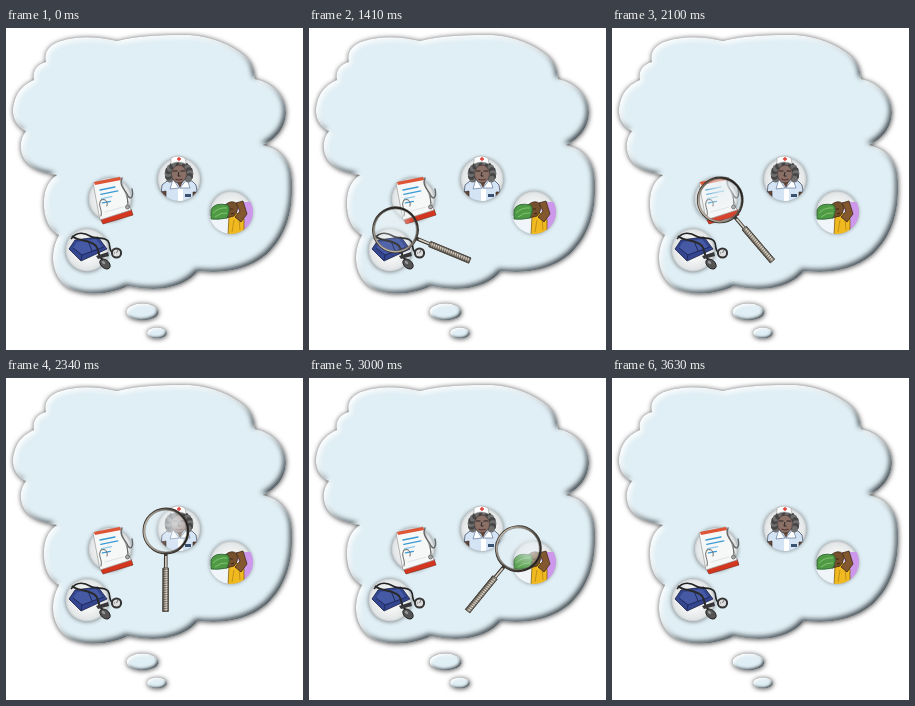
Animation, 297 px wide and 322 px high, one loop 3900 ms. Source, as an HTML page with a canvas:

```html
<!DOCTYPE html>
<html lang="en">
<head>
<meta charset="utf-8">
<title>Thought bubble</title>
<style>
html, body { margin: 0; width: 100%; height: 100%; overflow: hidden; background: #fff; }
canvas { display: block; width: 297px; height: 322px; }
</style>
</head>
<body>
<canvas id="stage" width="297" height="322"></canvas>
<script>
const W = 297, H = 322, LOOP = 3900, STEP = 30, TAU = Math.PI * 2;
const ctx = document.getElementById('stage').getContext('2d');
const scene = document.createElement('canvas');
scene.width = W;
scene.height = H;
const g = scene.getContext('2d');

const cloud = new Path2D(`M28 52 C26 43 31 36 40 34 C37 24 44 16 55 13
  C73 7 94 9 111 13 C134 7 160 7 184 7 C205 8 226 17 239 28
  C246 34 249 43 249 51 C265 54 280 67 280 84
  C280 100 269 112 257 117 C277 121 287 137 286 156
  C287 182 281 207 261 226 C241 243 215 246 192 243
  C181 257 156 266 122 258 C106 266 82 269 64 261
  C48 252 41 229 53 207 C41 201 37 186 38 171 C39 160 43 152 51 147
  C34 145 17 138 15 122 C14 114 16 108 20 103
  C8 98 5 85 8 75 C11 62 19 56 28 52Z`);

function oval(x, y, rx, ry = rx, turn = 0) {
  const p = new Path2D();
  p.ellipse(x, y, rx, ry, turn, 0, TAU);
  return p;
}

function shadow(color, blur, dx, dy) {
  g.shadowColor = color;
  g.shadowBlur = blur;
  g.shadowOffsetX = dx;
  g.shadowOffsetY = dy;
}

// Shades the inside of a path along its edge
function innerShade(path, color, blur, dx, dy) {
  const inverse = new Path2D();
  inverse.rect(-60, -60, W + 120, H + 120);
  inverse.addPath(path);
  g.save();
  g.clip(path);
  shadow(color, blur, dx, dy);
  g.fillStyle = '#aaa';
  g.fill(inverse, 'evenodd');
  g.restore();
}

function puff(path, depth) {
  g.save();
  shadow('rgba(0,0,0,.7)', 5, 0.3, 0.5);
  g.fillStyle = '#e0eff5';
  g.fill(path);
  g.restore();
  innerShade(path, 'rgba(45,54,60,.9)', depth, -depth * 0.5, -depth * 0.5);
  innerShade(path, '#fff', depth, depth * 0.5, depth * 0.5);
}

function shape(d, fill, line, width = 0.8) {
  const p = d instanceof Path2D ? d : new Path2D(d);
  if (fill) {
    g.fillStyle = fill;
    g.fill(p);
  }
  if (line) {
    g.strokeStyle = line;
    g.lineWidth = width;
    g.stroke(p);
  }
}

function disc(x, y, r) {
  const grad = g.createRadialGradient(x, y, r * 0.5, x, y, r);
  grad.addColorStop(0, '#f3f4f4');
  grad.addColorStop(0.8, '#e3e6e7');
  grad.addColorStop(1, '#c3c8ca');
  g.save();
  shadow('rgba(70,75,80,.7)', 4, 0, 0.5);
  shape(oval(x, y, r), grad);
  g.restore();
}

function pressureGauge() {
  disc(81, 222, 21.5);
  shape('M63 221 L69 212 L92 209 L101 221 L75 233Z', '#34468f', '#181f45');
  shape('M67 220 L71 214 L90 211 L96 219 L76 227Z', '#4559a4');
  shape('M75 232 L76 227 L98 219 M82 213 L86 223 M67 220 L76 227', null, '#20295c', 1);
  shape('M65 211 C71 203 79 205 84 208 C90 212 98 208 102 213 C105 217 102 222 107 225', null, '#222', 1.6);
  shape('M66 208 C73 214 84 211 90 218 C94 223 91 228 97 232', null, '#292929', 2);
  shape('M90 228 L102 224 L103 228 L92 231Z', '#37373a');
  shape(oval(99, 236, 6, 4, 0.75), '#555', '#202020', 1);
  shape(oval(97.5, 234.5, 2, 1.2, 0.7), '#999');
  shape(oval(110.5, 225, 4.6), '#ddd', '#333', 2);
  shape('M110.5 225 L112 222 M108 225 H109', null, '#555', 0.8);
}

function chart() {
  disc(104, 171, 21.5);
  shape('M94 190 L125 181 L127 187 L97 196Z', '#d4351e', '#792313', 0.6);
  shape('M87 155 L114 149 L125 182 L94 192Z', '#f6f7f7', '#999', 0.7);
  shape('M88 154 L114 149 L115 152 L89 157Z', '#de5434');
  g.lineCap = 'round';
  for (let i = 0; i < 4; i++) {
    const x = 94 + i * 0.8, y = 162 + i * 4.3;
    const len = [15, 17, 10, 8][i];
    shape(`M${x} ${y} l${len} ${-len * 0.2}`, null, i === 2 ? '#8cc8e8' : '#3a9bd4', 1.3);
  }
  shape('M99 184 l18 -5', null, '#d9dde0', 0.8);
  shape('M116 150 C113 157 118 161 121 166 C124 173 128 170 126 161', null, '#666', 1.4);
  shape('M95 172 C91 178 97 181 95 188 M95 172 C100 170 102 174 101 178 M121 167 L122 178', null, '#666', 1);
  shape(oval(121.5, 179, 2), '#aaa', '#555', 0.7);
  g.lineCap = 'butt';
}

function nurse() {
  disc(173, 151, 21.5);
  g.save();
  g.clip(oval(173, 151, 22));
  shape('M154 177 L156 157 Q160 152 168 151 L180 151 Q187 152 190 157 L193 177Z', '#d5e4f5', '#48566c');
  shape('M154 164 L160 163 L160 175 L152 175Z M187 164 L193 164 L194 175 L187 175Z', '#60483d', '#33261f', 0.6);
  shape('M168 149 L179 149 L174 160Z', '#65493d');
  shape('M167 151 L173 160 L164 161Z M181 151 L174 160 L184 160Z', '#fff', '#6f87a8', 0.8);
  shape('M172 161 H177 V175 H172Z', '#fff');
  shape('M179 166 H185 V169 H179Z', '#39506e');
  for (let i = 0; i < 15; i++) {
    const a = Math.PI * (0.82 + i * 1.36 / 14);
    shape(oval(173 + 11 * Math.cos(a), 146 + 9.5 * Math.sin(a), 3.4), i % 2 ? '#474647' : '#6f6e6e');
  }
  shape(oval(173, 146, 7.5, 9), '#8b7068', '#3b302d', 0.7);
  shape('M167 143 h4.5 M174.5 143 h4.5 M173 144 l-1 4 h2.5', null, '#282424', 1);
  shape('M169.5 151 Q173 153 176.5 151', null, '#532f2b', 1.1);
  g.restore();
  shape('M165 136 L165 130 Q172 126 179 130 L180 136 Q172 132 165 136Z', '#fff', '#aaa', 0.7);
  shape('M171 131 h4 M173 129 v4', null, '#df3932', 1.3);
}

function patient() {
  disc(225, 184, 21);
  g.save();
  g.clip(oval(225, 184, 22));
  shape('M203 188 Q214 189 224 197 L223 207 H207Z', '#f0f5f9');
  shape('M230 174 H247 V192 L239 205Z', '#cd97ec');
  shape('M223 188 L231 185 L238 191 L238 207 H222Z', '#efb91f', '#806018');
  shape('M228 192 L226 204 M233 190 L234 202', null, '#b78716', 0.8);
  shape('M219 177 Q226 171 231 176 Q233 183 228 188 L220 190Z', '#76502d', '#392613');
  shape('M230 175 L237 173 L241 186 L235 194 L229 189 L234 183Z', '#83582f', '#402c19');
  shape('M205 182 Q208 174 222 177 Q225 182 221 190 Q211 192 205 191Z', '#4f9b45', '#285b30');
  shape('M207 185 Q213 179 221 180 M209 189 Q215 184 221 185', null, '#83c26f', 1);
  shape('M224 181 h3 M225 186 l3 -1', null, '#2e1d10', 0.8);
  g.restore();
}

function lens(angle, alpha) {
  ctx.save();
  ctx.globalAlpha = alpha;
  ctx.translate(159.5, 232);
  ctx.rotate(angle * Math.PI / 180);

  const glass = ctx.createRadialGradient(-88, -9, 3, -86, -7, 21);
  glass.addColorStop(0, 'rgba(232,240,243,.75)');
  glass.addColorStop(0.4, 'rgba(232,240,243,.5)');
  glass.addColorStop(1, 'rgba(232,240,243,.08)');
  ctx.fillStyle = glass;
  ctx.fill(oval(-79, 0, 22));

  const rim = ctx.createLinearGradient(0, -22, 0, 22);
  rim.addColorStop(0, '#1d1b19');
  rim.addColorStop(0.45, '#5b544b');
  rim.addColorStop(1, '#c2b8a8');
  for (const [r, width, color] of [[22.6, 1.6, '#3a3632'], [21.8, 1.5, rim], [20.9, 0.5, '#6a655e']]) {
    ctx.lineWidth = width;
    ctx.strokeStyle = color;
    ctx.stroke(oval(-79, 0, r));
  }

  const metal = ctx.createLinearGradient(0, -3, 0, 3);
  metal.addColorStop(0, '#55504a');
  metal.addColorStop(0.35, '#e4ded1');
  metal.addColorStop(0.65, '#aca294');
  metal.addColorStop(1, '#3c3833');
  ctx.fillStyle = '#3a3632';
  ctx.fillRect(-57, -1.8, 16, 3.6);
  ctx.fillStyle = '#d5cdbf';
  ctx.fillRect(-54, -1, 12, 1.7);
  ctx.fillStyle = metal;
  ctx.fillRect(-42, -3, 43.5, 6);
  ctx.strokeStyle = 'rgba(65,58,50,.7)';
  ctx.lineWidth = 0.8;
  ctx.beginPath();
  for (let x = -41; x < 1; x += 2.3) {
    ctx.moveTo(x, -3);
    ctx.lineTo(x + 0.7, 3);
  }
  ctx.stroke();
  ctx.strokeStyle = '#49433c';
  ctx.strokeRect(-42, -2.8, 43.5, 5.6);
  ctx.restore();
}

function progress(t, start, steps) {
  const k = Math.floor((t - start) / STEP);
  return Math.max(0, Math.min(steps, k)) / steps;
}

function draw(now) {
  const t = now % LOOP;
  ctx.fillStyle = '#fff';
  ctx.fillRect(0, 0, W, H);
  ctx.drawImage(scene, 0, 0);
  const alpha = progress(t, 570, 11) - progress(t, 3270, 12);
  const angle = 7 + 42.5 * progress(t, 1290, 11)
    + 51 * progress(t, 2100, 10) + 43 * progress(t, 2820, 9);
  if (alpha > 0) lens(angle, alpha);
}

puff(cloud, 5);
puff(oval(136.5, 284, 16, 8.5), 3);
puff(oval(151, 305, 10, 5.5), 2.5);
pressureGauge();
chart();
nurse();
patient();

const began = performance.now();
function tick() {
  draw(performance.now() - began);
  requestAnimationFrame(tick);
}
tick();
</script>
</body>
</html>
```
